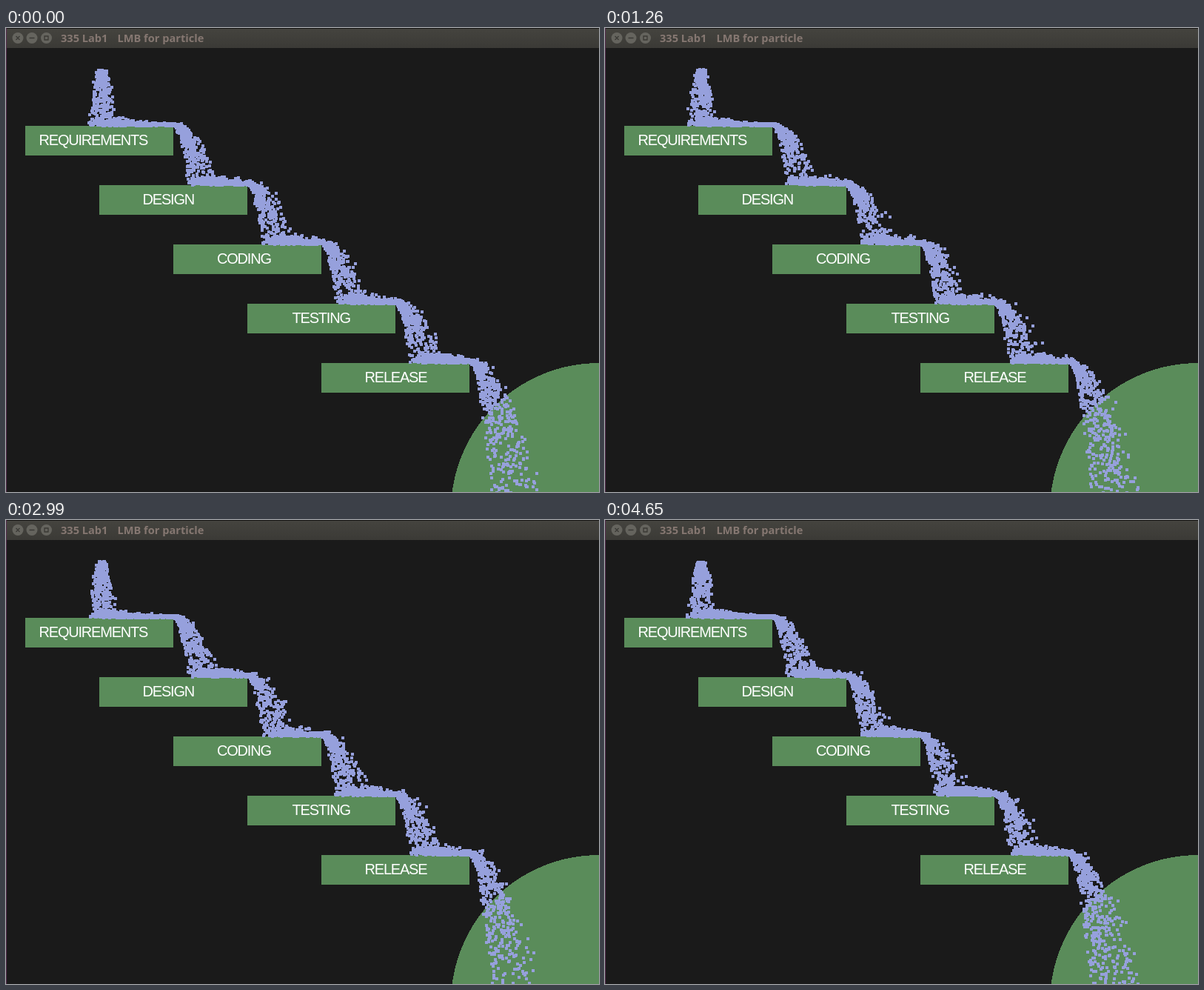
Recreate the animation shown at these times as an HTML page with a canvas. Size 801 by 626 pixels, loop 4.71 s.

```html
<!DOCTYPE html>
<html lang="en">
<head>
<meta charset="utf-8">
<title>Waterfall model</title>
<style>
  html, body { margin: 0; width: 100%; height: 100%; overflow: hidden; background: #1a1a1a; }
  svg, canvas { position: absolute; left: 0; top: 0; display: block; }
  .label { font: 20px "Liberation Sans", Arial, sans-serif; letter-spacing: -1.2px; fill: #fff; }
  .title { font: bold 14.6px "Open Sans", "Noto Sans", sans-serif; fill: #857771; }
</style>
</head>
<body>
<svg id="scene" width="801" height="626" viewBox="0 0 801 626">
  <defs>
    <linearGradient id="bar" x2="0" y2="1">
      <stop offset="0" stop-color="#45443f"/>
      <stop offset="1" stop-color="#3b3a36"/>
    </linearGradient>
  </defs>
  <rect width="801" height="626" fill="#1a1a1a"/>
  <rect width="801" height="27" fill="url(#bar)"/>
  <rect width="801" height="1" fill="#171614"/>
  <rect width="1" height="626" fill="#542d4e"/>
  <g fill="#65645e">
    <circle cx="16" cy="13.5" r="7.5"/>
    <circle cx="35" cy="13.5" r="7.5"/>
    <circle cx="54.5" cy="13.5" r="7.5"/>
  </g>
  <path d="M13.5 11l5 5m0-5l-5 5M31.5 13.5h7M52 11h5v5h-5z" fill="none" stroke="#3a3935" stroke-width="1.3"/>
  <text class="title" x="74" y="18.5">335 Lab1</text>
  <text class="title" x="150.5" y="18.5">LMB for particle</text>
  <circle cx="801" cy="652" r="200" fill="#5a8c5a" shape-rendering="crispEdges"/>
  <g id="steps"></g>
</svg>
<canvas id="water" width="801" height="626"></canvas>
<script>
const LOOP = 4710, STEPS_PER_MS = 0.06, WARMUP = 1100;
const RATE = 9, GRAVITY = 0.1;
const LABELS = [["REQUIREMENTS", 44.5], ["DESIGN", 184.5], ["CODING", 285], ["TESTING", 386.5], ["RELEASE", 484.5]];
// runs of picture changes: start, end, count
const RUNS = [
  [100, 560, 9], [650, 1070, 8], [1210, 1720, 9], [1770, 2220, 9], [2330, 2780, 8],
  [2880, 3340, 9], [3430, 3910, 8], [3960, 4380, 7], [4510, 4650, 4]
];

const NS = "http://www.w3.org/2000/svg";
function add(tag, attrs, text = "") {
  const el = document.createElementNS(NS, tag);
  for (const key in attrs) el.setAttribute(key, attrs[key]);
  el.textContent = text;
  document.getElementById("steps").append(el);
}
LABELS.forEach(([text, x], i) => {
  add("rect", { x: 26 + 100 * i, y: 132 + 80 * i, width: 200, height: 40, fill: "#5a8c5a" });
  add("text", { x, y: 157.5 + 80 * i, class: "label" }, text);
});

let seed = 335;
function rnd() {
  seed = (seed * 1664525 + 1013904223) >>> 0;
  return seed / 4294967296;
}
const spread = r => (rnd() * 2 - 1) * r;

let drops = [];
function spawn() {
  drops.push({
    x: 130 + spread(2.5), y: 61 + spread(1),
    vx: spread(0.41), vy: -0.45 + spread(0.45),
    level: 0, lift: spread(1.4)
  });
}

function move(p) {
  p.x += p.vx;
  p.y += p.vy;
  p.vy += GRAVITY;
  if (p.level === 5) return;
  if (p.x > 226 + 100 * p.level) {
    p.level++;
    return;
  }
  const floor = 130.5 + 80 * p.level + p.lift;
  if (p.y < floor) return;
  p.y = floor;
  if (p.vy > 2) {
    p.vx = 0.5 + 1.05 * rnd();
    p.vy *= -0.1 - 0.24 * rnd();
  } else {
    p.vy = p.vy > 0.25 ? p.vy * -0.6 : 0;
  }
}

function step() {
  for (let i = 0; i < RATE; i++) spawn();
  drops.forEach(move);
  drops = drops.filter(p => p.y < 630);
}

function snapshot() {
  const spots = new Int16Array(drops.length * 2);
  drops.forEach((p, i) => {
    spots[2 * i] = Math.round(p.x) - 2;
    spots[2 * i + 1] = Math.round(p.y) - 2;
  });
  return spots;
}

const times = [0];
for (const [from, to, count] of RUNS) {
  for (let i = 0; i < count; i++) {
    times.push(Math.round((from + (to - from) * i / (count - 1)) / 10) * 10);
  }
}

for (let i = 0; i < WARMUP; i++) step();
let done = 0;
const poses = times.map(t => {
  for (; done < Math.round(t * STEPS_PER_MS); done++) step();
  return snapshot();
});

const ctx = document.getElementById("water").getContext("2d");
let shown = -1;
function draw(t) {
  let k = times.length - 1;
  while (times[k] > t) k--;
  if (k === shown) return;
  shown = k;
  ctx.clearRect(0, 0, 801, 626);
  ctx.fillStyle = "#96a0dc";
  const spots = poses[k];
  for (let i = 0; i < spots.length; i += 2) ctx.fillRect(spots[i], spots[i + 1], 4, 4);
}

const start = performance.now();
function tick() {
  draw((performance.now() - start) % LOOP);
  requestAnimationFrame(tick);
}
tick();
</script>
</body>
</html>
```
